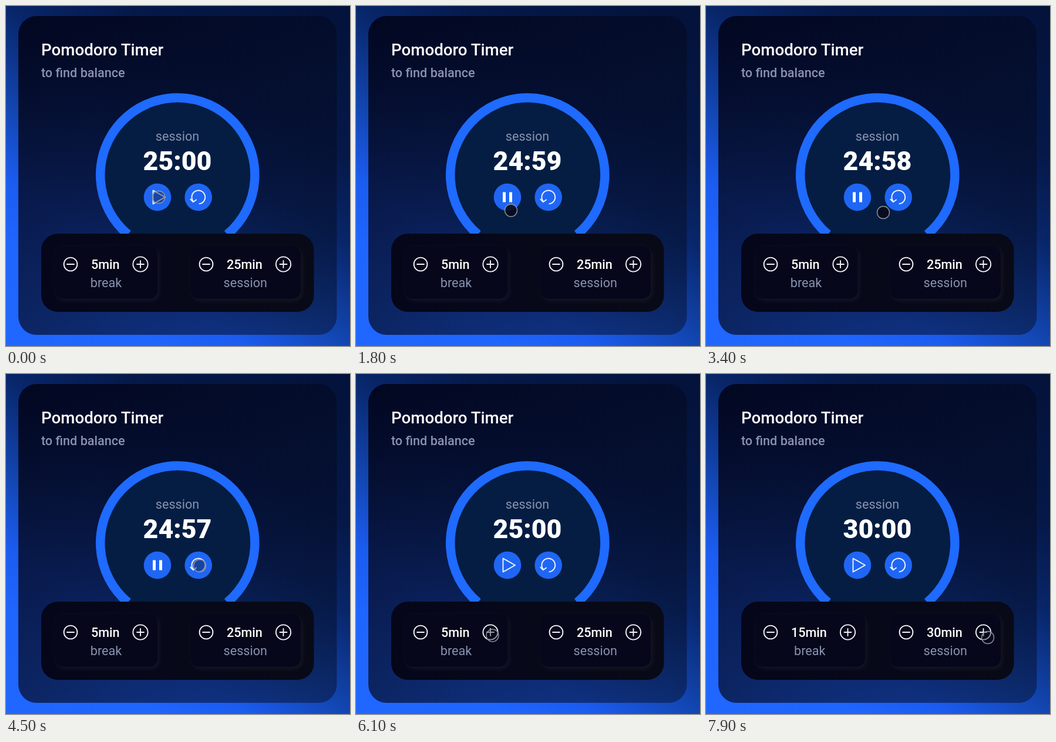
These frames come from a looping animation (586 px wide and 578 px high, 8000 ms). An HTML page:

```html
<!DOCTYPE html>
<html lang="en">
<head>
<meta charset="utf-8">
<title>Pomodoro Timer</title>
<style>
  html, body { margin: 0; width: 100%; height: 100%; overflow: hidden; background: #06194a; }
  svg { display: block; width: 100vw; height: 100vh; }
  text { font-family: Roboto, Arial, sans-serif; font-size: 21.6px; fill: #fff; }
  .mid { text-anchor: middle; }
  .soft { fill: #8992b0; }
  .semi { font-weight: 500; }
  .line { fill: none; stroke: #f2f4fb; stroke-width: 1.9; stroke-linecap: round; stroke-linejoin: round; }
</style>
</head>
<body>
<svg viewBox="0 0 586 578">
  <defs>
    <linearGradient id="sky" gradientUnits="userSpaceOnUse" x1="0" y1="578" x2="462" y2="-86">
      <stop offset="0" stop-color="#2067ff"/>
      <stop offset=".18" stop-color="#1f65ff"/>
      <stop offset=".29" stop-color="#1b5cf0"/>
      <stop offset=".41" stop-color="#1347b4"/>
      <stop offset=".585" stop-color="#08266a"/>
      <stop offset=".74" stop-color="#051848"/>
      <stop offset="1" stop-color="#03123a"/>
    </linearGradient>
    <linearGradient id="glass" gradientUnits="userSpaceOnUse" x1="21" y1="17" x2="563" y2="559">
      <stop offset="0" stop-color="#02041a" stop-opacity=".92"/>
      <stop offset="1" stop-color="#06112e" stop-opacity=".5"/>
    </linearGradient>
    <linearGradient id="dock" x1="0" y1="0" x2="1" y2="0">
      <stop offset="0" stop-color="#05061a"/>
      <stop offset="1" stop-color="#090a17"/>
    </linearGradient>
    <filter id="blur" x="-20%" y="-20%" width="140%" height="140%"><feGaussianBlur stdDeviation="3"/></filter>
  </defs>

  <rect width="586" height="578" fill="url(#sky)"/>
  <rect x="21" y="17" width="542.5" height="542" rx="31" fill="url(#glass)"/>
  <text x="60" y="84" class="semi" style="font-size:27.7px">Pomodoro Timer</text>
  <text x="60" y="120.5" class="soft semi">to find balance</text>

  <circle cx="292.3" cy="287.5" r="131" fill="#051d42"/>
  <path id="ring" fill="none" stroke="#1f6aff" stroke-width="15.5"/>
  <text x="292" y="228.5" class="mid soft">session</text>
  <text id="clock" x="292" y="279" class="mid" style="font-size:44.6px;font-weight:800"></text>

  <g fill="#1f66f5"><circle cx="258" cy="325" r="23.3"/><circle cx="327.7" cy="325" r="23.3"/></g>
  <path id="play" class="line" d="M250.5 313.5V336.5L271 325Z"/>
  <path id="pause" fill="#fff" d="M250 316.5h5v17h-5zM261 316.5h5v17h-5z"/>
  <path class="line" d="M329.5 336.3A11.4 11.4 0 1 0 318.8 332M314.2 328.6L318.8 333.2L324 329.4"/>

  <rect x="60" y="387" width="464.5" height="133" rx="28" fill="url(#dock)"/>
  <g id="boxes"></g>
  <circle id="cursor" r="10.5" fill="#080c1c" stroke="#8d919f" stroke-width="1.4"/>
</svg>
<script>
const LOOP = 8000;
const START = 600, RESET = 4700, BREAK_1 = 6300, BREAK_2 = 6700, SESSION_1 = 7600;
const $ = id => document.getElementById(id);

// Cursor stops: time, x, y
const path = [
  [0, 260, 325], [900, 261, 326], [1300, 264, 340], [1800, 264, 347.5],
  [2600, 276, 352], [3400, 302, 351], [4100, 328, 329], [4500, 330, 326],
  [4800, 330, 326], [5600, 245, 426], [6100, 232.5, 444.5], [6900, 234, 440],
  [7500, 474, 441], [7900, 480, 448], [8000, 480, 448]
];

function cursorAt(t) {
  const i = Math.max(1, path.findIndex(p => p[0] > t));
  const [t0, x0, y0] = path[i - 1], [t1, x1, y1] = path[i];
  const u = (t - t0) / (t1 - t0), e = u * u * (3 - 2 * u);
  return [x0 + (x1 - x0) * e, y0 + (y1 - y0) * e];
}

function ringPath(cx, cy, r, gap) {
  const dx = r * Math.sin(gap), dy = r * Math.cos(gap);
  return `M${cx - dx} ${cy + dy}A${r} ${r} 0 1 1 ${cx + dx} ${cy + dy}`;
}

function stepper(x, width, minutes, label, selected) {
  const mid = x + width / 2, minus = x + 28, plus = x + width - 30;
  return `
    <rect x="${x + 3}" y="411" width="${width}" height="91" rx="15" fill="#fff" opacity=".045" filter="url(#blur)"/>
    <rect x="${x}" y="407" width="${width}" height="91" rx="15" fill="#06071a" stroke="#fff" stroke-opacity=".025"/>
    ${selected ? `<rect x="${plus - 13.5}" y="425.5" width="27" height="26.5" fill="#34618f"/>` : ''}
    <circle class="line" cx="${minus}" cy="439" r="11.4"/>
    <path class="line" d="M${minus - 6} 439h12"/>
    <circle class="line" cx="${plus}" cy="439" r="12.6"/>
    <path class="line" d="M${plus - 6} 439h12M${plus} 433v12"/>
    <text x="${mid - 1.3}" y="447" class="mid semi">${minutes}min</text>
    <text x="${mid}" y="477.5" class="mid soft">${label}</text>`;
}

let shown = '';
function draw(t) {
  const running = t >= START && t < RESET;
  const rest = t < BREAK_1 ? 5 : t < BREAK_2 ? 10 : 15;
  const session = t < SESSION_1 ? 25 : 30;
  const selected = t >= BREAK_2 && t < SESSION_1;
  const left = session * 60 - (running ? Math.floor((t - START) / 1000) : 0);
  const width = rest < 10 ? 177 : 189.5;

  $('clock').textContent = Math.floor(left / 60) + ':' + String(left % 60).padStart(2, '0');
  $('play').style.display = running ? 'none' : '';
  $('pause').style.display = running ? '' : 'none';

  const key = [rest, session, selected].join();
  if (key !== shown) {
    $('boxes').innerHTML = stepper(82, width, rest, 'break', selected) + stepper(313, 189.5, session, 'session', false);
    shown = key;
  }

  // The cursor turns see-through over a control
  const [x, y] = cursorAt(t);
  const controls = [[258, 325, 22], [327.7, 325, 22], [52 + width, 439, 13], [472.5, 439, 13]];
  const hover = controls.some(([cx, cy, r]) => Math.hypot(x - cx, y - cy) < r);
  const cursor = $('cursor');
  cursor.setAttribute('cx', x);
  cursor.setAttribute('cy', y);
  cursor.setAttribute('fill-opacity', hover ? .38 : .9);
}

$('ring').setAttribute('d', ringPath(292.3, 287.5, 131.6, 40 * Math.PI / 180));
const begin = performance.now();
function tick() {
  draw((performance.now() - begin) % LOOP);
  requestAnimationFrame(tick);
}
tick();
</script>
</body>
</html>
```
